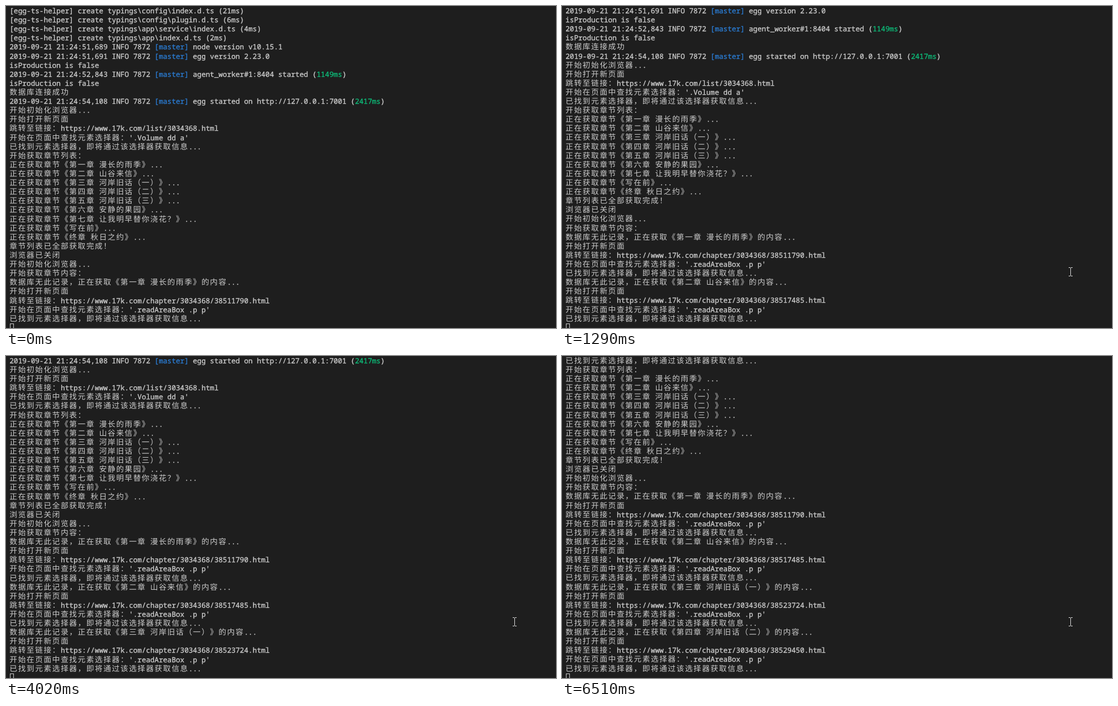
An HTML page for the animation above (8 s loop, 977 by 573 pixels).

```html
<!DOCTYPE html>
<html lang="zh-CN">
<head>
<meta charset="utf-8">
<title>Terminal log</title>
<style>
  :root { --row: 16.12px; --cell: 7.578px; --bg: #1e1e1e; --fg: #ccc; }
  html, body { margin: 0; width: 100%; height: 100%; overflow: hidden; background: var(--bg); }
  #stage { position: relative; width: 977px; height: 573px; overflow: hidden; background: var(--bg); color: var(--fg); }
  #log, #prompt, #mouse { position: absolute; animation: 8s step-end infinite; }
  #log {
    left: 6.3px; white-space: pre;
    font: 12.63px "Noto Sans Mono", "DejaVu Sans Mono", monospace;
    line-height: var(--row); text-rendering: geometricPrecision; font-variant-ligatures: none;
    -webkit-text-stroke: .35px currentColor;
    animation-name: scroll;
  }
  #log div { height: var(--row); }
  .cjk {
    font: 300 13.6px/0 "Noto Sans CJK SC", "Noto Sans CJK", sans-serif;
    letter-spacing: calc(2 * var(--cell) - 13.6px);
    text-spacing-trim: space-all; font-kerning: none;
    -webkit-text-stroke-width: 0;
  }
  .tag { color: #2b7cd3; }
  .ms { color: #0dbc79; }
  /* hides the line not printed yet and carries the text cursor */
  #prompt { left: 6.3px; top: 564.7px; width: 977px; height: 20px; background: var(--bg); animation-name: prompt; }
  #prompt::before { content: ""; position: absolute; left: .7px; top: .3px; width: 5px; height: 14px; border: 1px solid var(--fg); }
  #mouse { width: 7px; height: 16px; animation-name: mouse; }

  @keyframes scroll {
    0%       { top: 0; }
    0.875%   { top: calc(-1 * var(--row)); }
    1.8125%  { top: calc(-2 * var(--row)); }
    12.125%  { top: calc(-3 * var(--row)); }
    16.125%  { top: calc(-5 * var(--row)); }
    36.75%   { top: calc(-6 * var(--row)); }
    37.625%  { top: calc(-7 * var(--row)); }
    47.375%  { top: calc(-8 * var(--row)); }
    50.25%   { top: calc(-10 * var(--row)); }
    69.625%  { top: calc(-11 * var(--row)); }
    71.125%  { top: calc(-12 * var(--row)); }
    79.5%    { top: calc(-13 * var(--row)); }
    81.375%, 100% { top: calc(-15 * var(--row)); }
  }
  @keyframes prompt {
    0%, 1.8125%, 37.625%, 71.125%, 100% { left: 6.3px; }
    0.875%, 36.75%, 69.625% { left: calc(6.3px + 14 * var(--cell)); }
  }
  @keyframes mouse {
    0%     { left: 906px; top: 541px; opacity: 0; }
    8.5%   { left: 906px; top: 541px; opacity: 1; }
    9.375% { left: 900px; top: 501px; opacity: 1; }
    11.25% { left: 900px; top: 469px; opacity: 1; }
    12.125%, 100% { left: 900px; top: 465px; opacity: 1; }
  }
</style>
</head>
<body>
<div id="stage">
  <div id="log"></div>
  <div id="prompt"></div>
  <svg id="mouse" viewBox="0 0 7 16" fill="none" stroke="#ddd" shape-rendering="crispEdges">
    <path d="M0 .5H3M4 .5H7M3.5 1V15M0 15.5H3M4 15.5H7"/>
  </svg>
</div>
<script>
  const chapters = [
    '第一章 漫长的雨季', '第二章 山谷来信', '第三章 河岸旧话（一）',
    '第四章 河岸旧话（二）', '第五章 河岸旧话（三）', '第六章 安静的果园',
    '第七章 让我明早替你浇花？', '写在前', '终章 秋日之约'
  ];
  const pages = [38511790, 38517485, 38523724, 38529450];

  const created = (path, ms) => `[egg-ts-helper] create typings\\${path}.d.ts (${ms}ms)`;
  const info = (time, text) => `2019-09-21 21:24:${time} INFO 7872 [master] ${text}`;
  const visit = (path, selector) => [
    '开始打开新页面',
    `跳转至链接：https://www.17k.com/${path}.html`,
    `开始在页面中查找元素选择器：'${selector}'`,
    '已找到元素选择器，即将通过该选择器获取信息...'
  ];

  const lines = [
    created('config\\index', 21),
    created('config\\plugin', 6),
    created('app\\service\\index', 4),
    created('app\\index', 2),
    info('51,689', 'node version v10.15.1'),
    info('51,691', 'egg version 2.23.0'),
    'isProduction is false',
    info('52,843', 'agent_worker#1:8404 started (1149ms)'),
    'isProduction is false',
    '数据库连接成功',
    info('54,108', 'egg started on http://127.0.0.1:7001 (2417ms)'),
    '开始初始化浏览器...',
    ...visit('list/3034368', '.Volume dd a'),
    '开始获取章节列表：',
    ...chapters.map(name => `正在获取章节《${name}》...`),
    '章节列表已全部获取完成！',
    '浏览器已关闭',
    '开始初始化浏览器...',
    '开始获取章节内容：',
    ...pages.flatMap((id, i) => [
      `数据库无此记录，正在获取《${chapters[i]}》的内容...`,
      ...visit(`chapter/3034368/${id}`, '.readAreaBox .p p')
    ])
  ];

  const span = name => text => `<span class="${name}">${text}</span>`;
  const paint = line => (line.startsWith('2019')
    ? line.replace('[master]', span('tag')).replace(/\d+ms/, span('ms'))
    : line).replace(/[\u2e80-\uffef]+/g, span('cjk'));

  document.getElementById('log').innerHTML =
    lines.map(line => `<div>${paint(line)}</div>`).join('');
</script>
</body>
</html>
```
